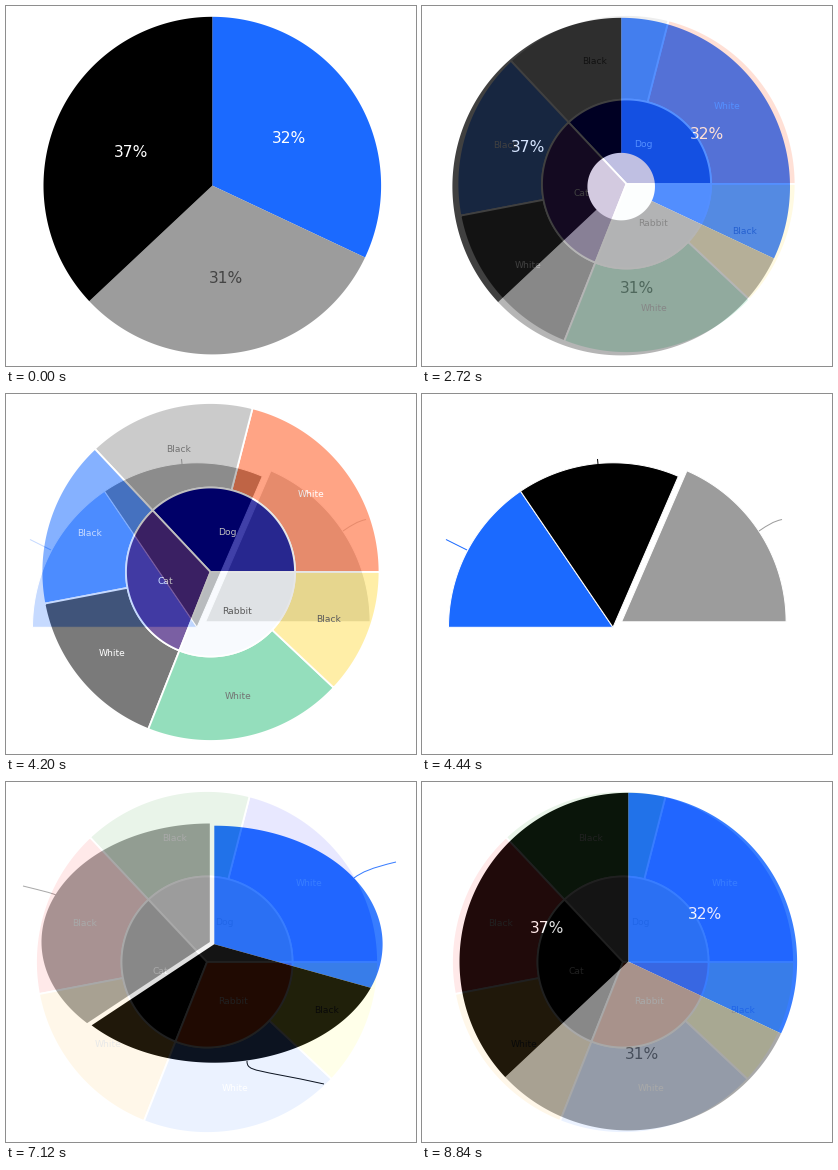
A matplotlib script for the animation above (8.88 s loop, 410 by 360 pixels).

```python
import numpy as np
import matplotlib.pyplot as plt
from matplotlib.animation import FuncAnimation
from matplotlib.patches import PathPatch, Polygon
from matplotlib.path import Path

W, H, DPI = 410, 360, 80
STEP = 40            # ms per frame
HOLD, FADE = 30, 8   # frames a chart rests, steps of a cross-fade
SPAN = HOLD + FADE - 1

BLUE, GREY, BLACK, INK = "#1b6aff", "#9c9c9c", "#000000", "#444444"

plt.rcParams["font.family"] = "DejaVu Sans"
fig = plt.figure(figsize=(W / DPI, H / DPI), dpi=DPI, facecolor="white")


def stage():
    ax = fig.add_axes([0, 0, 1, 1])
    ax.set_xlim(0, W)
    ax.set_ylim(H, 0)
    ax.axis("off")
    return ax


def sector(ax, cx, cy, rx, ry, a0, a1, color, inner=0, edge=0):
    """Slice between two angles in degrees, counter-clockwise from the right."""
    t = np.radians(np.linspace(a0, a1, 150))
    arc = np.column_stack([rx * np.cos(t), -ry * np.sin(t)])
    back = arc[::-1] * inner if inner else np.zeros((1, 2))
    pts = np.vstack([arc, back]) + (cx, cy)
    ax.add_patch(Polygon(pts, fc=color, ec="white" if edge else "none",
                         lw=edge * 72 / DPI, joinstyle="round"))


def label(ax, x, y, text, size, color):
    ax.text(x, y + 0.36 * size, text, size=size * 72 / DPI, color=color,
            ha="center", va="baseline")


def connector(ax, color, *pts):
    codes = [Path.MOVETO] + [Path.CURVE4 if len(pts) == 4 else Path.LINETO] * (len(pts) - 1)
    ax.add_patch(PathPatch(Path(pts, codes), fc="none", ec=color, lw=72 / DPI))


def pie(ax, cx, cy, r, hole, spots):
    slices = [(32, BLUE, "white"), (31, GREY, INK), (37, BLACK, "white")]
    start = 90
    for (pct, color, ink), (x, y) in zip(slices, spots):
        end = start - 3.6 * pct
        sector(ax, cx, cy, r, r, end, start, color, hole)
        label(ax, x, y, f"{pct}%", 15.5, ink)
        start = end


def sunburst(ax, cx, cy, r, core, ring):
    """Two rings of (name, percent, fill, ink)."""
    def draw(parts, r_out, inner, mids):
        start = 0
        for (name, pct, color, ink), mid in zip(parts, mids):
            end = start + 3.6 * pct
            sector(ax, cx, cy, r_out, r_out, start, end, color, inner, 1.8)
            a = np.radians((start + end) / 2)
            label(ax, cx + mid * r * np.cos(a), cy - mid * r * np.sin(a), name, 9.2, ink)
            start = end

    draw(ring, r, 0.5, [0.752] * 6)
    draw(core, r / 2, 0, [0.258, 0.275, 0.275])


def full_pie(ax):
    pie(ax, 206.3, 179.6, 168.8, 0, [(283.3, 131.5), (220.5, 271.5), (125.5, 145.5)])


def donut(ax):
    pie(ax, 199.2, 180.6, 168.8, 0.2, [(285, 127), (215, 281), (106.5, 140.5)])


def sunburst_soft(ax):
    sunburst(ax, 204.5, 178, 169,
             [("Dog", 37, "#00008b", "white"), ("Cat", 32, "#4e2a84", "white"),
              ("Rabbit", 31, "#f5f9fd", INK)],
             [("White", 21, "#ff855c", "white"), ("Black", 16, "#bababa", INK),
              ("Black", 16, "#5c97ff", "white"), ("White", 16, "#4d4d4d", "white"),
              ("White", 19, "#70d3a5", INK), ("Black", 12, "#ffe98a", INK)])


def sunburst_bright(ax):
    sunburst(ax, 201, 180, 171,
             [("Dog", 37, GREY, INK), ("Cat", 32, BLACK, "white"),
              ("Rabbit", 31, "#ff4f14", "white")],
             [("White", 21, "#4b4bff", "white"), ("Black", 16, "#4ca64c", "white"),
              ("Black", 16, "#ff4d4d", "white"), ("White", 16, "#ffc14d", INK),
              ("White", 19, "#5c97ff", "white"), ("Black", 12, "#ffff4d", INK)])


def half_pie(ax):
    r = 164.5
    sector(ax, 191, 233.3, r, r, 124.2, 180, BLUE, edge=1)
    sector(ax, 191, 233.3, r, r, 66.6, 124.2, BLACK, edge=1)
    sector(ax, 199.6, 227.8, r, r, 0, 66.6, GREY, edge=1)
    connector(ax, BLUE, (24, 145.5), (45, 156))
    connector(ax, BLACK, (175.5, 65), (176, 70))
    connector(ax, GREY, (337, 137), (346, 131), (351, 127.5), (360, 125.5))


def tilted_pie(ax):
    rx, ry = 168.3, 118.5
    sector(ax, 208.3, 162.2, rx, ry, -21.6, 90, BLUE)
    sector(ax, 208.3, 162.2, rx, ry, -136.8, -21.6, BLACK)
    sector(ax, 203.8, 160, rx, ry, 90, 223.2, GREY)
    connector(ax, BLUE, (348, 96), (356, 90), (365, 86), (390, 80))
    connector(ax, BLACK, (241, 279), (241, 290), (250, 287), (318, 302))
    connector(ax, GREY, (50, 113), (44, 110.5), (37, 109), (17, 104))


def render(chart):
    fig.clear()
    chart(stage())
    fig.canvas.draw()
    return np.asarray(fig.canvas.buffer_rgba())[..., :3].astype(float)


charts = [full_pie, donut, sunburst_soft, half_pie, tilted_pie, sunburst_bright]
slides = [render(c) for c in charts]

fig.clear()
view = stage().imshow(slides[0].astype(np.uint8), extent=(0, W, H, 0),
                      interpolation="nearest", aspect="auto")


def update(i):
    n, local = divmod(i, SPAN)
    mix = max(0, local - HOLD + 1) / FADE
    now, after = slides[n], slides[(n + 1) % len(slides)]
    view.set_data(np.rint(now + (after - now) * mix).astype(np.uint8))
    return [view]


anim = FuncAnimation(fig, update, frames=SPAN * len(slides), interval=STEP,
                     repeat=True, repeat_delay=0, blit=False)
plt.show()
```
